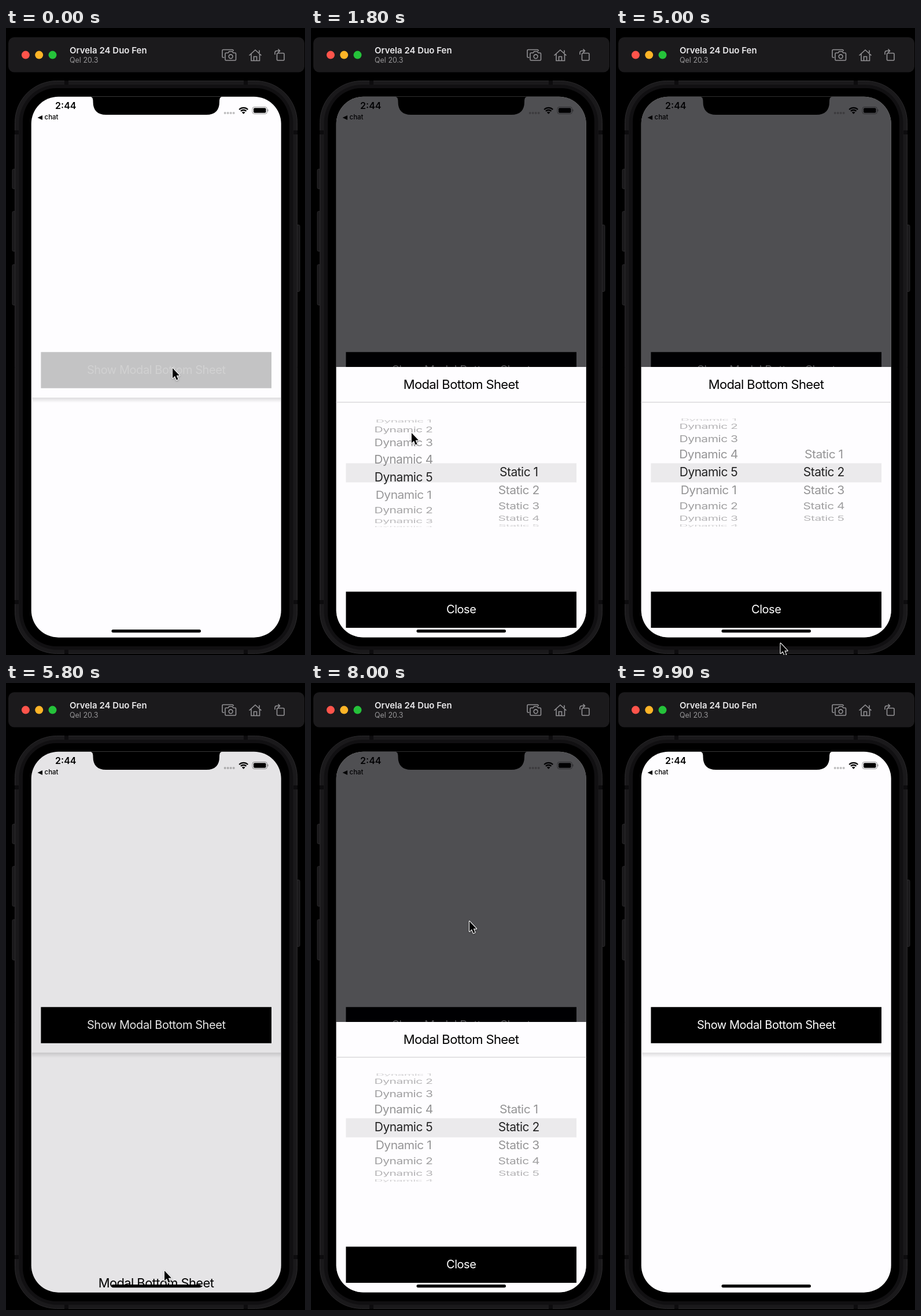
Write an HTML page with a canvas that moves like this. It is 517 px wide and 1084 px high and loops after 10000 ms.

```html
<!DOCTYPE html>
<html lang="en">
<head>
<meta charset="utf-8">
<title>Modal Bottom Sheet</title>
<style>
  html, body { margin: 0; width: 517px; height: 1084px; overflow: hidden; background: #000; }
  canvas { display: block; }
</style>
</head>
<body>
<canvas id="stage" width="517" height="1084"></canvas>
<script>
const ctx = document.getElementById('stage').getContext('2d');
const LOOP = 10000;
const PAPER = '#fefdff';
const SCREEN = { x: 43.7, y: 118.7, w: 432, h: 935, r: 47 };
const SHEET = { top: 586, height: 467.5, hidden: 490 };
const WHEEL = { step: 19.3 * Math.PI / 180, radius: 93.5 };

const clamp = (v, lo = 0, hi = 1) => Math.min(hi, Math.max(lo, v));

// Eased interpolation through [time, value, value...] keys.
function track(keys, t) {
  const next = keys.findIndex(k => k[0] > t);
  if (next === 0) return keys[0].slice(1);
  if (next < 0) return keys[keys.length - 1].slice(1);
  const a = keys[next - 1], b = keys[next];
  const p = (t - a[0]) / (b[0] - a[0]);
  const e = p * p * (3 - 2 * p);
  return a.slice(1).map((v, i) => v + (b[i + 1] - v) * e);
}

const cursorKeys = [
  [0, 288, 588], [520, 288, 588], [1000, 170, 795], [1450, 172, 700], [1850, 174, 700],
  [2250, 355, 800], [2750, 368, 723], [3300, 368, 723], [3750, 366, 830], [4300, 350, 838],
  [4950, 285, 1066], [5350, 274, 1016], [5850, 274, 1016],
  [6500, 267, 589], [7200, 267, 589], [7850, 274, 412], [8550, 274, 412], [9300, 338, 62]
];
const dynamicKeys = [[1050, 0], [1950, 4]];
const staticKeys = [[2300, 0], [3050, 4], [3350, 4], [4150, 1]];
const showKeys = [[50, .23], [300, 1], [6600, 1], [6700, .23], [6800, .23], [7060, 1]];
const closeKeys = [[5400, 1], [5500, .23], [5600, .23], [5850, 1]];
const sheetMoves = [[55, 0], [5635, SHEET.hidden], [6820, 0], [8083, SHEET.hidden]];

const dynamicRows = Array.from({ length: 10 }, (_, i) => `Dynamic ${i % 5 + 1}`);
const staticRows = Array.from({ length: 5 }, (_, i) => `Static ${i + 1}`);

// Remaining share of the distance in a lightly underdamped spring.
function spring(seconds) {
  const decay = 11, omega = 10.45, phase = omega * seconds;
  return Math.exp(-decay * seconds) * (Math.cos(phase) + decay / omega * Math.sin(phase));
}

function sheetOffset(t) {
  const move = sheetMoves.filter(m => m[0] <= t).pop();
  if (!move) return SHEET.hidden;
  const [start, target] = move;
  return target + (SHEET.hidden - 2 * target) * spring((t - start) / 1000);
}

function box(x, y, w, h, r, fill, stroke) {
  ctx.beginPath();
  ctx.roundRect(x, y, w, h, r);
  if (fill) { ctx.fillStyle = fill; ctx.fill(); }
  if (stroke) { ctx.strokeStyle = stroke; ctx.lineWidth = 1; ctx.stroke(); }
}

function dot(x, y, r, fill) {
  ctx.beginPath();
  ctx.arc(x, y, r, 0, 7);
  ctx.fillStyle = fill;
  ctx.fill();
}

function text(str, x, y, size, fill, { weight = 400, align = 'center', spacing = 0 } = {}) {
  ctx.font = `${weight} ${size}px Inter, sans-serif`;
  ctx.letterSpacing = `${spacing}px`;
  ctx.textAlign = align;
  ctx.textBaseline = 'middle';
  ctx.fillStyle = fill;
  ctx.fillText(str, x, y);
}

function button(label, y, alpha) {
  ctx.globalAlpha = alpha;
  box(60.4, y, 398.6, 62.5, 0, '#000');
  text(label, 259.7, y + 31.5, 20, '#fff', { spacing: -.45 });
  ctx.globalAlpha = 1;
}

const icons = new Path2D(
  // stacked cameras
  'M377.5 51h-2q-1.5 0-1.5-1.5V39q0-1.5 1.5-1.5h16q1.5 0 1.5 1.5v1' +
  'M380.5 43h3.5l2-2.5h5l2 2.5h3q1.5 0 1.5 1.5v10q0 1.5-1.5 1.5h-15.5q-1.5 0-1.5-1.5v-10q0-1.5 1.5-1.5z' +
  'M392 49.3a3.4 3.4 0 1 1-6.8 0a3.4 3.4 0 1 1 6.8 0' +
  // house
  'M420.5 47.5L431 38l10.5 9.5M424 45v11.5h14.5V45M428.5 56v-6.5h5v6.5M438 43v-4.5' +
  // rotate
  'M470 43.5h9.5q1.5 0 1.5 1.5v9.5q0 1.5-1.5 1.5h-9.5q-1.5 0-1.5-1.5v-9.5q0-1.5 1.5-1.5z' +
  'M465 46v-3q0-3.5 3.5-3.5h4.5M470.5 36.5l3 3-3 3'
);

function drawToolbar() {
  box(4, 16, 512, 60.5, 10, '#1b1a1c');
  ['#ff544b', '#fdb427', '#25c23a'].forEach((c, i) => dot(33.9 + i * 23.3, 46.6, 7, c));
  text('Orvela 24 Duo Fen', 110, 39.5, 15, '#eae9eb', { weight: 600, align: 'left' });
  text('Qel 20.3', 110, 56.5, 12.5, '#969597', { align: 'left' });
  ctx.strokeStyle = '#929194';
  ctx.lineWidth = 1.6;
  ctx.stroke(icons);
}

function drawBody() {
  const edge = '#2b2a2c', metal = '#1a191b';
  [[244, 34], [317, 69], [409, 70]].forEach(([y, h]) => box(11, y, 8, h, 2, metal, edge));
  box(500, 340.5, 8, 115, 2, metal, edge);
  box(15.5, 91.5, 488, 990, 72, metal, edge);
  const seam = '#0d0c0e';
  for (const x of [101, 411]) for (const y of [91, 1075]) box(x, y, 7, 7, 0, seam);
  for (const x of [15, 497]) for (const y of [177, 989]) box(x, y, 7, 7, 0, seam);
  box(22.5, 98, 474, 977, 66, '#111012');
  box(29, 104, 461, 965, 58, '#000');
}

function drawStatus() {
  text('2:44', 103.3, 135.5, 16, '#000', { weight: 600 });
  text('chat', 66.5, 155, 11.5, '#000', { weight: 500, align: 'left' });
  ctx.fill(new Path2D('M54.5 155L63 151v8z'));
  for (let i = 0; i < 4; i++) dot(378.7 + i * 5, 147, 2, 'rgba(0,0,0,.25)');

  ctx.strokeStyle = '#000';
  ctx.lineWidth = 2.4;
  for (const r of [6.7, 10.6]) {
    ctx.beginPath();
    ctx.arc(410.7, 148.5, r, -Math.PI * .75, -Math.PI * .25);
    ctx.stroke();
  }
  ctx.fillStyle = '#000';
  ctx.fill(new Path2D('M410.7 148.8l-2.9-3q2.9-2.3 5.8 0z'));

  box(426, 136.5, 25.5, 12, 3.5, null, 'rgba(0,0,0,.4)');
  box(428, 138.3, 21.5, 8.5, 2, '#000');
  box(452.3, 140.5, 1.3, 4, 1, 'rgba(0,0,0,.4)');
}

function drawNotch() {
  ctx.fillStyle = '#000';
  ctx.fill(new Path2D('M144 118.5q6.5 0 6.5 7v2q0 22.5 22.5 22.5h173.5q22.5 0 22.5-22.5v-2q0-7 6.5-7z'));
}

function fillScreen(fill) {
  box(43, 118, 434, 937, 0, fill);
}

function drawPage(t) {
  fillScreen(PAPER);
  const shade = ctx.createLinearGradient(0, 639, 0, 648);
  shade.addColorStop(0, 'rgba(0,0,0,.13)');
  shade.addColorStop(1, 'rgba(0,0,0,0)');
  box(45, 639, 430, 9, 0, shade);
  button('Show Modal Bottom Sheet', 560.3, track(showKeys, t)[0]);
  drawStatus();
}

function drawWheel(rows, x, y, position) {
  rows.forEach((row, i) => {
    const angle = (i - position) * WHEEL.step;
    if (Math.abs(angle) > 1.5) return;
    const flat = Math.cos(angle);
    const alpha = Math.abs(i - position) < .5 ? .86 : .43 * flat ** .6;
    ctx.save();
    ctx.translate(x, y + WHEEL.radius * Math.sin(angle));
    ctx.scale(1, flat);
    text(row, 0, 0, 21, `rgba(0,0,0,${alpha})`, { spacing: -.5 });
    ctx.restore();
  });
}

function drawSheet(t, offset) {
  const top = SHEET.top + offset;
  ctx.globalAlpha = clamp((415 - offset) / 60);
  box(43, top, 434, SHEET.height, 0, PAPER);
  ctx.globalAlpha = 1;
  text('Modal Bottom Sheet', 259.5, top + 31, 22, '#000', { spacing: -.62 });
  box(43, top + 60, 434, 2, 0, '#e3e2e4');
  box(60.4, top + 166.5, 398.6, 33, 0, '#ebeaec');
  drawWheel(dynamicRows, 160, top + 183, track(dynamicKeys, t)[0]);
  drawWheel(staticRows, 359.3, top + 183, track(staticKeys, t)[0]);
  button('Close', top + 388.5, track(closeKeys, t)[0]);
}

function drawCursor(t) {
  if (t >= 9300) return;
  const [x, y] = track(cursorKeys, t);
  ctx.save();
  ctx.translate(x, y);
  const arrow = new Path2D('M0 0V17.5L4 13.8L6.8 20.5L9.6 19.3L6.8 12.8H12z');
  ctx.shadowColor = 'rgba(0,0,0,.3)';
  ctx.shadowBlur = 3;
  ctx.shadowOffsetY = 1;
  ctx.strokeStyle = '#fff';
  ctx.lineWidth = 2.2;
  ctx.lineJoin = 'round';
  ctx.stroke(arrow);
  ctx.shadowColor = 'transparent';
  ctx.fillStyle = '#000';
  ctx.fill(arrow);
  ctx.restore();
}

function draw(t) {
  const offset = sheetOffset(t);
  box(0, 0, 517, 1084, 0, '#000');
  drawToolbar();
  drawBody();

  ctx.save();
  ctx.beginPath();
  ctx.roundRect(SCREEN.x, SCREEN.y, SCREEN.w, SCREEN.h, SCREEN.r);
  ctx.clip();
  drawPage(t);
  fillScreen(`rgba(1,0,3,${.686 * clamp(1 - offset / SHEET.hidden)})`);
  drawSheet(t, offset);
  drawNotch();
  const overButton = offset > 8 && offset < 68;
  box(182.5, 1040, 154.5, 5.2, 2.6, overButton ? '#4c4b4d' : '#000');
  ctx.restore();

  drawCursor(t);
}

function frame() {
  draw(performance.now() % LOOP);
  requestAnimationFrame(frame);
}
frame();
</script>
</body>
</html>
```
